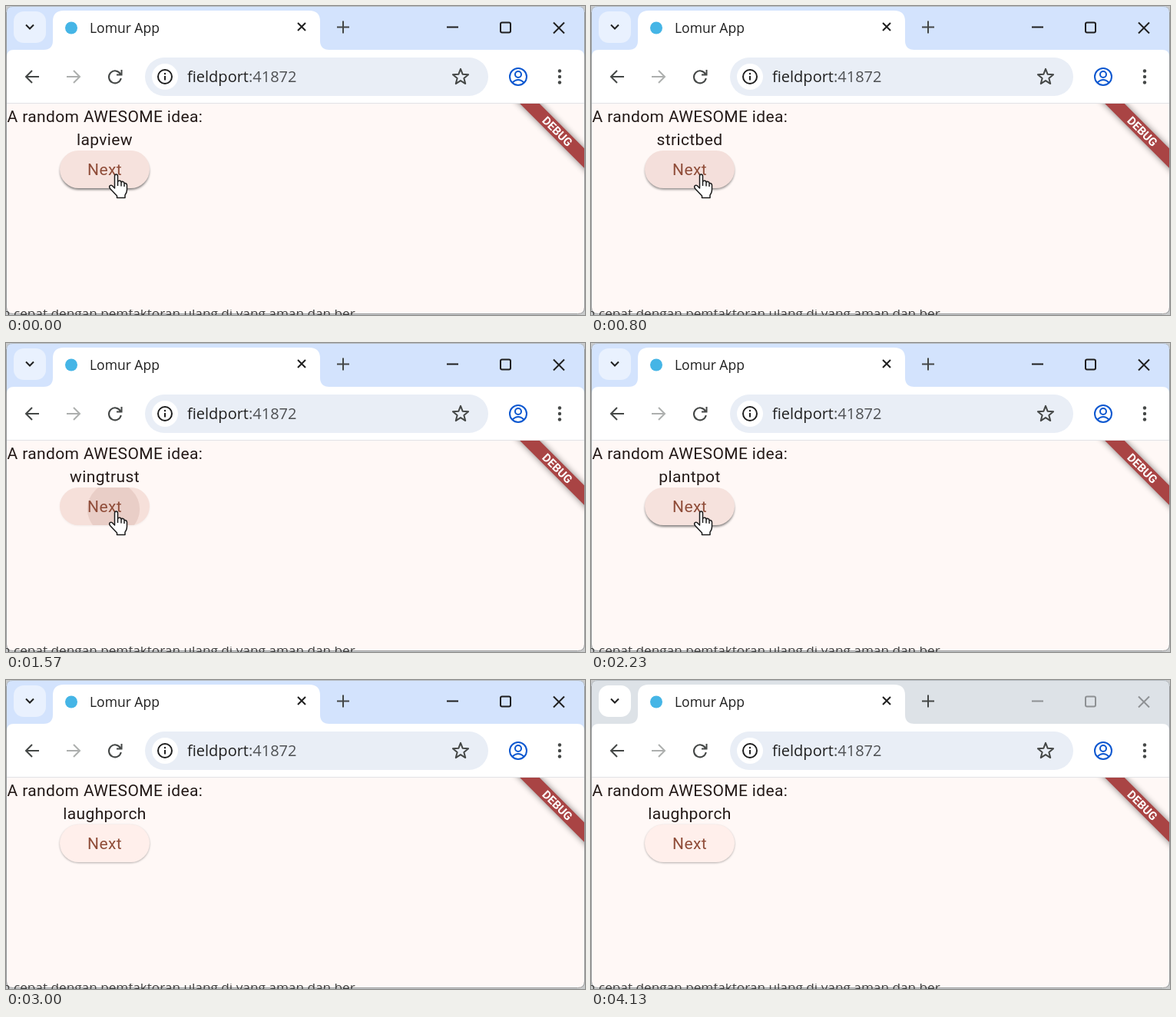
Animation, 754 px wide and 402 px high, one loop 4160 ms. Source, as an HTML page:

```html
<!DOCTYPE html>
<html lang="en">
<head>
<meta charset="utf-8">
<title>Word pairs</title>
<style>
  html, body { margin: 0; width: 100%; height: 100%; overflow: hidden; background: #c8cacb; }
  svg { display: block; width: 754px; height: 402px; }
  .ui { font-family: "Open Sans", "Noto Sans", sans-serif; }
  .app { font-family: Roboto, "Noto Sans", sans-serif; font-size: 21px; letter-spacing: .37px; fill: #231917; }
  .line { fill: none; stroke: #1f1f1f; stroke-width: 2; }
  .icon { stroke: #444746; }
</style>
</head>
<body>
<svg viewBox="0 0 754 402">
  <defs>
    <clipPath id="frame"><path d="M1 8Q1 0 9 0H745Q753 0 753 8V392Q753 401 744 401H10Q1 401 1 392Z"/></clipPath>
    <clipPath id="pill"><rect x="70" y="188" width="117" height="49" rx="24.5"/></clipPath>
    <clipPath id="page"><rect x="1" y="127" width="752" height="274"/></clipPath>
    <clipPath id="strip"><rect y="395" width="460" height="7"/></clipPath>
    <filter id="soft" x="-30%" y="-60%" width="160%" height="220%"><feGaussianBlur stdDeviation="1.5"/></filter>
    <filter id="glow" x="-20%" y="-100%" width="140%" height="300%"><feGaussianBlur stdDeviation="4.5"/></filter>
  </defs>

  <rect width="754" height="402" fill="#c8cacb"/>
  <path d="M0 86v8M0 128v3M0 182v4M0 293v8M0 356v8" stroke="#2c2c2c" stroke-width="1.6"/>

  <g clip-path="url(#frame)">
    <rect id="bar" width="754" height="70"/>
    <path d="M1 126V66Q1 57 10 57H49Q61 57 61 45V20Q61 6 75 6H395Q409 6 409 20V45Q409 57 421 57H744Q753 57 753 66V126Z" fill="#fff"/>
    <rect id="menu" x="10" y="7" width="42" height="41" rx="13"/>
    <path class="line" d="M26 24.5l5 5 5-5"/>

    <circle cx="85" cy="28.5" r="8" fill="#45b5e6"/>
    <text class="ui" x="109" y="35" font-size="17.5" fill="#1f1f1f">Lomur App</text>
    <path class="line" d="M380 22l10 10M390 22l-10 10"/>
    <path class="line icon" d="M431 27.5h16M439 19.5v16"/>
    <g id="controls" class="line">
      <path d="M574 27.5h15M713 21.5l14 14M727 21.5l-14 14"/>
      <rect x="644" y="21.5" width="13" height="13" rx="2"/>
    </g>

    <path class="line icon" d="M43 92H26M34 84l-8 8 8 8"/>
    <path class="line" d="M79 92h17M88 84l8 8-8 8" style="stroke:#adafae"/>
    <path class="line icon" d="M149 88.5a8 8 0 1 0 .8 5.5M150.5 83v6.5H144"/>
    <rect x="181" y="67" width="447" height="50" rx="25" fill="#e9eef6"/>
    <circle cx="207" cy="92" r="17" fill="#fff"/>
    <circle class="line" cx="207" cy="92" r="9"/>
    <path class="line" d="M207 91v5.5M207 87v2.2"/>
    <text class="ui" x="236" y="99" font-size="20" fill="#1f1f1f">fieldport<tspan fill="#4f5154">:41872</tspan></text>
    <path id="star" class="line icon" stroke-linejoin="round"/>
    <g class="line" style="stroke:#0b57d0">
      <circle cx="667" cy="92" r="11"/>
      <circle cx="667" cy="89" r="4"/>
      <path d="M659.5 99.5q7.5-7 15 0"/>
    </g>
    <g fill="#444746"><circle cx="721" cy="84.5" r="2.2"/><circle cx="721" cy="92" r="2.2"/><circle cx="721" cy="99.5" r="2.2"/></g>

    <rect y="126" width="754" height="276" fill="#fff8f6"/>
    <path d="M0 126.5H754" stroke="#e1e3e6"/>
    <text class="app" x="1.5" y="151">A random AWESOME idea:</text>
    <text id="word" class="app" x="128.5" y="181" text-anchor="middle"></text>

    <rect id="shade" x="70.5" y="188.5" width="116" height="48" rx="24" fill="#000" filter="url(#soft)"/>
    <rect id="button" x="70" y="188" width="117" height="49" rx="24.5"/>
    <g clip-path="url(#pill)"><circle id="ripple" cx="140" cy="216" fill="#8f4c38"/></g>
    <text class="app" x="128.5" y="220" text-anchor="middle" style="fill:#8f4c38">Next</text>

    <g clip-path="url(#page)">
      <g transform="translate(718 163) rotate(45)">
        <rect x="-75" y="-9" width="150" height="18" opacity=".5" filter="url(#glow)"/>
        <rect x="-75" y="-9" width="150" height="18" fill="#a94444"/>
        <text y="5.4" text-anchor="middle" font-family="Roboto, sans-serif" font-size="15" font-weight="700" fill="#fff">DEBUG</text>
      </g>
    </g>
  </g>
  <path d="M.5 8V392Q.5 400.5 9.5 400.5H744.5Q753.5 400.5 753.5 392V8" fill="none" stroke="#96999b"/>
  <path d="M.5 8Q1 .5 9 .5H745Q753 .5 753.5 8" fill="none" stroke="#b4babf"/>
  <g clip-path="url(#strip)">
    <text class="ui" x="-5" y="406" font-size="17.2" fill="#2e2e2e" opacity=".9">n cepat dengan pemfaktoran ulang di yang aman dan ber</text>
  </g>

  <g id="cursor" fill="#fff" stroke="#1c1c1c" stroke-width="1.5" stroke-linejoin="round">
    <path id="hand" d="M141.5 236V221.5Q141.5 219 143.5 219T145.5 221.5V229Q146 227 148 227.2T150 229.5Q150.5 228 152.3 228.5T154 231Q154.5 230 156 230.7T157.5 233V239Q157.5 243 155 246V249.5H144.5V247L136 238Q133.5 235 135.5 233.7T139.5 235L141.5 237ZM145.5 229V234M150 229.5V234.5M154 231V235"/>
    <path id="arrow" d="M142 219v22l5-5 4 9 4-2-4-9h7Z"/>
  </g>
</svg>
<script>
const LOOP = 4160;
const BLUR_AT = 3930;
const EXIT = [2680, 2880];
const words = ["lapview", "strictbed", "wingtrust", "plantpot", "laughporch"];
const presses = [[330, 480], [1150, 1270], [1470, 1620], [2290, 2430]];

const $ = id => document.getElementById(id);
const clamp = v => Math.max(0, Math.min(1, v));
const ramp = (t, from, to) => clamp((t - from) / (to - from));
const mix = (a, b, k) => a.map((v, i) => v + (b[i] - v) * k);
const rgb = c => `rgb(${c.map(Math.round)})`;
const set = (id, attrs) => {
  for (const key in attrs) $(id).setAttribute(key, attrs[key]);
};

const REST = [255, 239, 235], HOVER = [246, 226, 221], PRESSED = [246, 224, 218];

const star = Array.from({ length: 10 }, (_, i) => {
  const r = i % 2 ? 4.6 : 10.6, a = i * Math.PI / 5;
  return `${592 + r * Math.sin(a)} ${92.5 - r * Math.cos(a)}`;
});
set("star", { d: `M${star.join("L")}Z` });

function drawButton(t, hover) {
  const [down, up] = presses.filter(p => p[0] <= t).pop() || [Infinity, Infinity];
  const held = clamp((t - down) / 90);
  const fade = 1 - ramp(t, up, up + 375);
  const press = Number.isFinite(down) ? held * fade : 0;
  const grow = 19 + 44 * (1 - Math.exp(-(Math.min(t, up) - down) / 240));
  const radius = grow + (110 - grow) * ramp(t, up, up + 225);

  set("button", { fill: rgb(mix(mix(REST, HOVER, hover), PRESSED, press)) });
  set("ripple", { r: press ? radius : 0, opacity: press * .12 });
  set("shade", {
    opacity: (.4 + .1 * hover) * (1 - .85 * press),
    transform: `translate(0 ${1 + 1.5 * hover * (1 - press)})`
  });
}

function drawCursor(t) {
  const k = ramp(t, ...EXIT);
  const x = -185 * k * k, y = 12 * k;
  const over = x > -72;
  set("cursor", { transform: `translate(${x} ${y})`, visibility: k < 1 ? "visible" : "hidden" });
  set("hand", { display: over ? "inline" : "none" });
  set("arrow", { display: over ? "none" : "inline" });
}

function draw(t) {
  const active = t < BLUR_AT;
  set("bar", { fill: active ? "#d3e3fd" : "#dde2e7" });
  set("menu", { fill: active ? "#e9f1fe" : "#fff" });
  $("controls").style.stroke = active ? "#1f1f1f" : "#8e9194";
  $("word").textContent = words[presses.filter(p => p[1] <= t).length];
  drawButton(t, 1 - ramp(t, 2790, 2960));
  drawCursor(t);
}

function tick() {
  draw(performance.now() % LOOP);
  requestAnimationFrame(tick);
}
tick();
</script>
</body>
</html>
```
